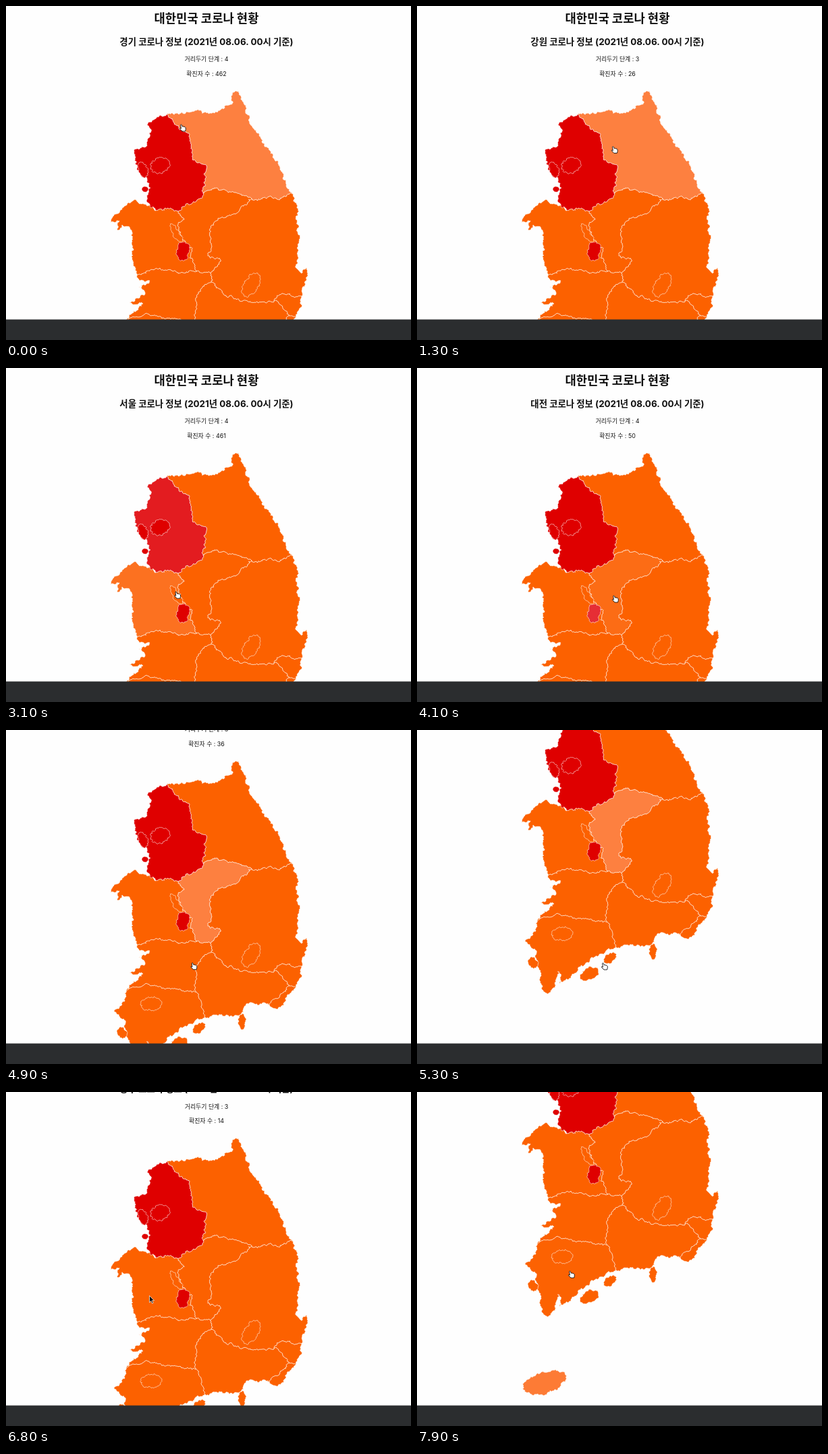
An HTML page for the animation above (8000 ms loop, 600 by 496 pixels).

```html
<!DOCTYPE html>
<html lang="ko">
<head>
<meta charset="utf-8">
<style>
html, body { margin: 0; width: 100%; height: 100%; overflow: hidden; background: #fefefe }
svg { display: block; width: 600px; height: 496px }
text { font-family: Inter, "Noto Sans CJK KR", "Noto Sans CJK", sans-serif; font-size: 8.9px; fill: #111; text-anchor: middle }
.land { stroke: #fff; stroke-width: .55; stroke-linejoin: round }
</style>
</head>
<body>
<svg viewBox="0 0 600 496">
  <g id="page">
    <text x="297" y="24.5" style="font-size:17.7px;font-weight:700">대한민국 코로나 현황</text>
    <text id="head" x="297" y="57.7" style="font-size:13.4px;font-weight:700"></text>
    <text id="level" x="297" y="82.3"></text>
    <text id="count" x="297" y="103.5"></text>
    <g id="map"></g>
  </g>
  <rect y="465.5" width="600" height="31" fill="#2b2d2f"/>
  <g id="cursor">
    <path id="hand" d="M-2.3-4.5q1.2-1 1.8.3l1 2.4 1.2-.3 1.2.4 1.2.3 1 1.1.2 2.5-.8 2.8h-4.6l-3.5-3.8q-.2-1.3 1.5-.5l.5.5z" fill="#fff" stroke="#111" stroke-width=".9"/>
    <path id="arrow" d="M-.5-5.5v10l2.3-2.1 1.7 3.6 1.7-.8-1.7-3.5h3z" fill="#111" stroke="#fff" stroke-width=".7"/>
  </g>
</svg>
<script>
const LOOP = 8000, FADE = 300;
const ORANGE = [252, 97, 0], RED = [223, 0, 0], GLOW = [255, 222, 255];
const $ = id => document.getElementById(id);

// Points where borders meet
const nodes = {
  A: [238, 161], B: [292, 278], C: [253, 304], D: [222, 304], E: [364, 286], F: [425, 279],
  G: [303, 397], H: [283, 394], I: [194, 400], J: [304, 410], K: [282, 469], L: [178, 466],
  M: [297, 508], N: [397, 438], O: [438, 431], P: [420, 460], Q: [430, 461], R: [386, 487]
};
// Key points on the way from one node to the next
const borders = {
  AB: '252,177 271,189 276,228 297,237 295,256', BC: '282,290 266,296', CD: '240,300',
  BE: '312,270 341,277', EF: '405,288', EG: '340,309 312,319 302,331 304,360 299,371 318,377',
  CH: '264,317 255,324 262,348 274,358 272,374', HG: '', GJ: '', IH: '228,389 262,396',
  LK: '205,458 231,464', JK: '285,425 281,455', KM: '289,490', JN: '326,430 359,439',
  NO: '405,429', NP: '', PQ: '', PR: '402,479'
};
const coasts = {
  DA: '210,292 214,270 209,257 200,250 191,226 190,216 209,207 215,186 209,177',
  AF: '282,155 300,160 333,146 336,128 341,126 361,167 408,246',
  FO: '431,300 435,340 431,390 438,397 446,389 446,402', OQ: '438,447', QR: '414,483 400,494',
  RM: '357,486 352,499 335,506 316,502',
  ML: '278,515 250,530 228,550 211,561 209,542 206,558 196,574 186,570 184,545 177,515 160,497 172,488',
  IL: '198,408 213,408 196,417 206,428 183,440 203,442',
  DI: '212,296 187,290 174,299 155,322 168,319 165,333 172,325 186,333 188,360'
};
const provinces = {
  gangwon: 'AFEBA', chungbuk: 'BEGHCB', chungnam: 'CHIDC', jeonbuk: 'HGJKLIH', jeonnam: 'LKML',
  gyeongnam: 'JNPRMKJ', gyeongbuk: 'EFONJGE', ulsan: 'NOQPN', busan: 'PQRP', gyeonggi: 'ABCDA'
};
// Cities and islands: centre, radii, tilt in degrees
const blobs = {
  incheon: [203, 243, 7, 12, -20], seoul: [228, 237, 15, 12, -20], sejong: [252, 337, 5, 16, -32],
  daejeon: [262, 364, 10, 14, 10], daegu: [363, 414, 11, 20, 30], gwangju: [215, 487, 16, 10, 0],
  ganghwa: [206, 272, 5, 4, 0], jindo: [172, 530, 7, 9, -30], wando: [255, 546, 15, 9, -25],
  namhae: [286, 523, 11, 6, -30], geoje: [350, 513, 5, 12, 0], jeju: [189, 673, 34, 16, -16]
};

let seed = 7;
const random = () => (seed = seed * 16807 % 2147483647) / 2147483647;

// Midpoint displacement gives lines their ragged look
function split(a, b, rough) {
  const dx = b[0] - a[0], dy = b[1] - a[1], length = Math.hypot(dx, dy);
  if (length < 2.5) return [a];
  const k = (random() - .5) * Math.min(.7, rough / length);
  const mid = [(a[0] + b[0]) / 2 - dy * k, (a[1] + b[1]) / 2 + dx * k];
  return [...split(a, mid, rough), ...split(mid, b, rough)];
}
const roughen = (list, rough) => [...list.slice(1).flatMap((p, i) => split(list[i], p, rough)), list.at(-1)];

const edges = {};
function addEdges(lines, rough) {
  for (const key in lines) {
    const [from, to] = key;
    const between = lines[key].split(' ').filter(Boolean).map(p => p.split(',').map(Number));
    edges[key] = roughen([nodes[from], ...between, nodes[to]], rough);
    edges[to + from] = [...edges[key]].reverse();
  }
}
addEdges(borders, 4);
addEdges(coasts, 5);

const ring = names => [...names].slice(1).flatMap((c, i) => edges[names[i] + c]);
function blob([x, y, rx, ry, tilt]) {
  const c = Math.cos(tilt * Math.PI / 180), s = Math.sin(tilt * Math.PI / 180);
  const outline = Array.from({ length: 13 }, (_, i) => {
    const a = i % 12 * Math.PI / 6, u = rx * Math.cos(a), v = ry * Math.sin(a);
    return [x + u * c - v * s, y + u * s + v * c];
  });
  return roughen(outline, 4);
}

const regions = {};
function addRegion(name, outline) {
  const el = document.createElementNS('http://www.w3.org/2000/svg', 'path');
  el.setAttribute('d', 'M' + outline.map(p => p.map(v => v.toFixed(1)).join(' ')).join('L') + 'Z');
  el.setAttribute('class', 'land');
  $('map').append(el);
  regions[name] = { el, base: /gyeonggi|incheon|seoul|daejeon|ganghwa/.test(name) ? RED : ORANGE };
}
for (const name in provinces) addRegion(name, ring(provinces[name]));
for (const name in blobs) addRegion(name, blob(blobs[name]));

// Region, time the pointer enters, time it leaves
const hovers = [
  ['gangwon', -500, 1350], ['gyeonggi', 1350, 1650], ['seoul', 1750, 2550],
  ['gyeonggi', 2550, 2950], ['chungnam', 2950, 3350], ['daejeon', 3350, 4050],
  ['chungbuk', 4000, 5400], ['jeonnam', 5420, 5900], ['gwangju', 6280, 6450],
  ['jeju', 7450, 7850], ['jeonnam', 7890, 9000]
];
const clicks = [
  [0, '경기', 4, 462], [700, '강원', 3, 26], [2300, '서울', 4, 461],
  [3700, '대전', 4, 50], [4450, '충북', 3, 36], [6350, '광주', 3, 14]
];
const pointer = [
  [0, 261, 181], [600, 301, 207], [1200, 296, 212], [1900, 223, 239], [2400, 225, 239],
  [3400, 261, 364], [3800, 262, 365], [4100, 293, 343], [5000, 277, 351], [5400, 277, 351],
  [6100, 213, 308], [7250, 213, 308], [7500, 192, 428], [7700, 192, 428], [7900, 228, 271]
];
const scroll = [[0, 0], [4650, 0], [5200, 184], [5600, 184], [6000, 176], [6450, 176], [6800, 57.5], [6900, 57.5], [7300, 242]];

const clamp = v => Math.max(0, Math.min(1, v));
function tween(keys, t) {
  const i = keys.findLastIndex(k => k[0] <= t), a = keys[i], b = keys[i + 1] || a;
  const u = b === a ? 0 : (t - a[0]) / (b[0] - a[0]), e = u * u * (3 - 2 * u);
  return a.slice(1).map((v, j) => v + (b[j + 1] - v) * e);
}

function draw(t) {
  const glow = {};
  for (const [name, start, end] of hovers) {
    const k = clamp((t - start) / FADE) * (1 - clamp((t - end) / FADE));
    glow[name] = Math.max(glow[name] || 0, k);
  }
  for (const name in regions) {
    const { el, base } = regions[name], k = .25 * (glow[name] || 0);
    el.setAttribute('fill', `rgb(${base.map((c, i) => Math.round(c + (GLOW[i] - c) * k))})`);
  }
  const [, city, level, count] = clicks.findLast(c => c[0] <= t);
  $('head').textContent = `${city} 코로나 정보 (2021년 08.06. 00시 기준)`;
  $('level').textContent = `거리두기 단계 : ${level}`;
  $('count').textContent = `확진자 수 : ${count}`;
  $('page').setAttribute('transform', `translate(0 ${-tween(scroll, t)[0]})`);
  $('cursor').setAttribute('transform', `translate(${tween(pointer, t)})`);
  const plain = t > 6500 && t < 7300;
  $('hand').style.display = plain ? 'none' : '';
  $('arrow').style.display = plain ? '' : 'none';
}

const begin = performance.now();
function frame() {
  draw((performance.now() - begin) % LOOP);
  requestAnimationFrame(frame);
}
frame();
</script>
</body>
</html>
```
